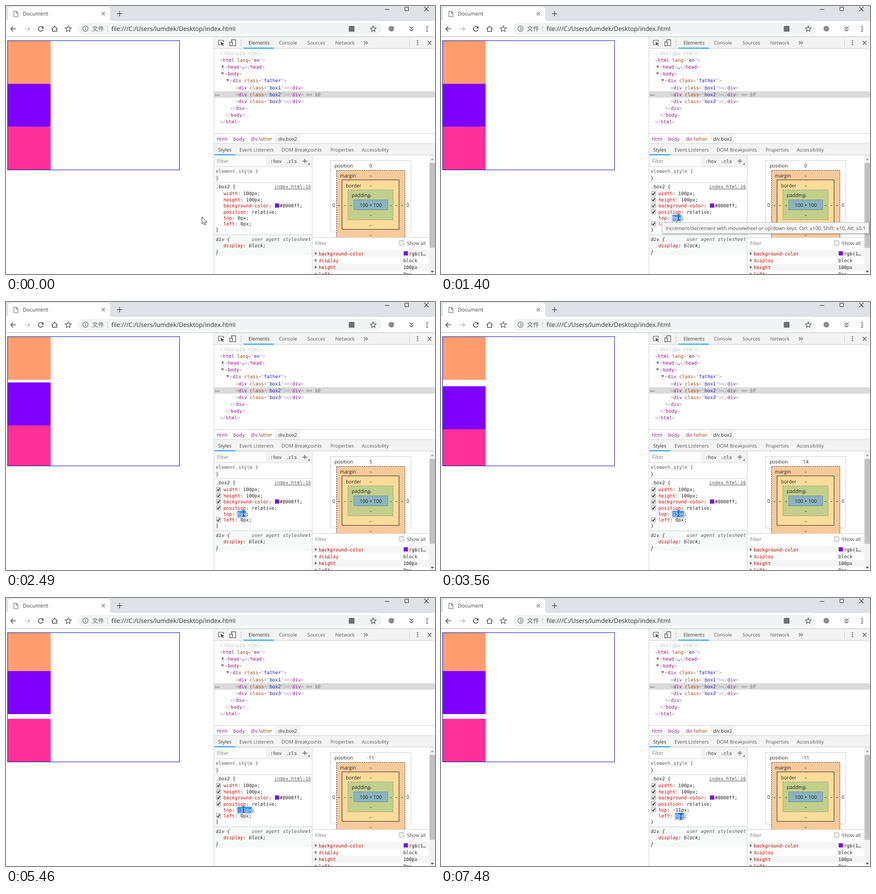
An HTML page that plays this animation: 948 px wide and 591 px high, repeating every 8000 ms.

```html
<!DOCTYPE html>
<html lang="en">
<head>
<meta charset="utf-8">
<title>Relative positioning</title>
<style>
html, body { margin: 0; width: 100%; height: 100%; overflow: hidden; background: #fff; }
svg { display: block; width: 948px; height: 591px; }
text { white-space: pre; text-rendering: geometricPrecision; }
.ui { font: 10.75px "Open Sans", "Noto Sans", sans-serif; }
.mono { font: 10.4px "DejaVu Sans Mono", monospace; }
</style>
</head>
<body>
<svg id="stage" viewBox="0 0 948 591" xmlns="http://www.w3.org/2000/svg"></svg>
<script>
const CHAR = 6.261;
const TAG = '#881280', ATTR = '#994500', VAL = '#1a1aa6', PUNCT = '#a894a6';
const PROP = '#c80000', INK = '#222', GREY = '#5a5a5a', LINE = '#ccc', BLUE = '#1a9bf0';

// ---- drawing helpers; text y is the middle of the row ----
const rect = (x, y, w, h, fill, more = '') =>
  `<rect x="${x}" y="${y}" width="${w}" height="${h}" fill="${fill}" ${more}/>`;
const path = (d, stroke = '#4a4d51', width = 1.4, fill = 'none') =>
  `<path d="${d}" fill="${fill}" stroke="${stroke}" stroke-width="${width}"/>`;
const solid = (d, fill) => `<path d="${d}" fill="${fill}"/>`;
const dot = (x, y, r, fill) => `<circle cx="${x}" cy="${y}" r="${r}" fill="${fill}"/>`;
const text = (cls, x, y, s, fill = INK, more = '') =>
  `<text class="${cls}" x="${x}" y="${y + 3.8}" fill="${fill}" ${more}>${s}</text>`;
const ui = (...a) => text('ui', ...a);
const mono = (...a) => text('mono', ...a);
const hue = (c, s) => `<tspan fill="${c}">${s}</tspan>`;
const size = n => `style="font-size:${n}px"`;
const mid = 'text-anchor="middle"', end = 'text-anchor="end"', italic = 'style="font-style:italic"';
const right = (x, y) => solid(`M${x} ${y - 3.5}l5 3.5l-5 3.5z`, '#6e6e6e');
const down = (x, y) => solid(`M${x} ${y - 2.5}h7l-3.5 5z`, '#6e6e6e');
const cross = (x, y, r, c, w) => path(`M${x - r} ${y - r}l${2 * r} ${2 * r}m0 ${-2 * r}l${-2 * r} ${2 * r}`, c, w);
const dots = (x, y, gap, r, c) => [-1, 0, 1].map(i => dot(x, y + i * gap, r, c)).join('');

function star(x, y, r) {
  let d = '';
  for (let i = 0; i < 10; i++) {
    const a = i * Math.PI / 5 - Math.PI / 2, q = i % 2 ? r * 0.45 : r;
    d += `${i ? 'L' : 'M'}${(x + q * Math.cos(a)).toFixed(2)} ${(y + q * Math.sin(a)).toFixed(2)}`;
  }
  return path(d + 'z', '#4a4d51', 1.2);
}

function browserBar() {
  return rect(0, 0, 948, 33, '#dee1e6') +
    solid('M-3 33Q4 33 4 27V9Q4 2 11 2H223Q230 2 230 9V27Q230 33 237 33Z', '#fff') +
    path('M17.5 11.5h5l4 4v8h-9zM22.5 11.5v4h4', '#5f6368', 1.1) +
    ui(37, 17.6, 'Document', '#3c4043', size(11.6)) +
    cross(215, 17, 3.6, '#5f6368', 1.3) +
    path('M245.5 17h11M251 11.5v11', '#4a4d51', 1.5) +
    path('M837 7.5h10M881.5 2.5h8v8h-8z', '#222', 1) +
    cross(929, 6.5, 4.8, '#222', 1.1) +
    rect(0, 33, 948, 34, '#fff') +
    rect(159, 37, 671, 26, '#f1f3f4', 'rx="13"') +
    path('M22 50.5H10.5M16 45l-5.5 5.5l5.5 5.5', '#4a4d51', 1.6) +
    path('M41 50.5h11.5M47 45l5.5 5.5l-5.5 5.5', '#b9bbbe', 1.6) +
    path('M81.3 47.2A5.3 5.3 0 1 0 82 52', '#4a4d51', 1.6) + solid('M83 44v5.5h-5.5z', '#4a4d51') +
    path('M100.5 51l6.8-6.5l6.8 6.5M102.8 49.5v6.5h9v-6.5', '#4a4d51', 1.5) +
    star(137.5, 50.5, 7.2) +
    `<circle cx="175.5" cy="50" r="5.8" fill="none" stroke="#5f6368" stroke-width="1.3"/>` +
    path('M175.5 49v4.2M175.5 46.6v1.4', '#5f6368', 1.4) +
    `<text x="190" y="55" fill="#5f6368" style="font:13.4px 'Noto Sans CJK SC','Noto Sans CJK',sans-serif">文件</text>` +
    rect(224, 43, 1, 14, '#c4c7ca') +
    ui(233, 51, 'file:///C:/Users/lumdek/Desktop/index.html', '#2b2e31', size(13.65)) +
    rect(757.5, 44, 12.5, 12.5, '#6b6e72') +
    star(811.5, 50.5, 6.6) +
    dot(851.5, 50, 6.2, '#8c8c8c') +
    path('M891.5 45.5l4.5 4l4.5-4M891.5 51l4.5 4l4.5-4', '#4a4d51', 1.6) +
    dots(930.5, 50.5, 4.7, 1.5, '#4a4d51') +
    rect(0, 67, 948, 1, '#b8babd');
}

function page() {
  return rect(4, 77, 94.6, 94.6, '#ff9d6f') + rect(4, 266.4, 94.6, 94.8, '#ff3097') +
    '<rect id="box" x="4" width="94.6" height="94.8" fill="#8000ff"/>' +
    rect(3.5, 76.5, 380, 285, 'none', 'stroke="#0000b4"');
}

const open = (name, attr, value) =>
  hue(PUNCT, '&lt;') + name +
  (attr ? ' ' + hue(ATTR, attr) + hue(PUNCT, '="') + hue(VAL, value) + hue(PUNCT, '"') : '') + hue(PUNCT, '&gt;');
const close = name => hue(PUNCT, '&lt;/') + name + hue(PUNCT, '&gt;');

function elements() {
  const child = n => open('div', 'class', 'box' + n) + close('div');
  const rows = [
    [473, hue('#c0c0c0', '&lt;!doctype html&gt;')],
    [473, open('html', 'lang', 'en')],
    [484, open('head') + hue(INK, '…') + close('head')],
    [484, open('body')],
    [495, open('div', 'class', 'father')],
    [507.5, child(1)], [507.5, child(2)], [507.5, child(3)],
    [495.5, close('div')], [484.5, close('body')], [473, close('html')]
  ];
  return rect(459, 68, 489, 26, '#f3f3f3') + rect(459, 93, 489, 1, LINE) +
    path('M474 85.5h-4.5v-10h11v4', '#5a5a5a', 1.2) + solid('M474 79l8.5 4l-3.6 1l2.6 3l-1.4 1.2l-2.6-3l-2 2.8z', '#5a5a5a') +
    path('M498.5 79v-4.5h9v13h-5M494.5 79.5h6v8h-6z', '#5a5a5a', 1.3) +
    rect(519, 73, 1, 16, LINE) + rect(891, 73, 1, 16, LINE) +
    ui(536, 81.5, 'Elements', '#333') + ui(603, 81.5, 'Console', GREY) +
    ui(666, 81.5, 'Sources', GREY) + ui(727.5, 81.5, 'Network', GREY) +
    rect(525, 92, 67, 2, BLUE) +
    path('M791 77.5l3.5 3.5l-3.5 3.5M795.5 77.5l3.5 3.5l-3.5 3.5', GREY, 1.3) +
    dots(909.5, 81, 4.2, 1.3, GREY) + cross(936, 81, 4, GREY, 1.5) +
    rect(460, 188, 488, 14, '#dadada') +
    [463.5, 467, 470.5].map(x => dot(x, 196.5, 1.2, '#6e6e6e')).join('') +
    right(477, 133.5) + down(475, 149) + down(486.5, 164) +
    rows.map(([x, s], i) => mono(x, 104 + i * 15.15, s, TAG)).join('') +
    mono(664, 195, '== $0', '#777', italic) +
    rect(460, 281, 488, 1, LINE) + rect(596, 282, 54, 21, '#f3f3f3') +
    ui(466, 293, 'html', TAG) + ui(502, 293, 'body', TAG) +
    ui(541, 293, hue(TAG, 'div') + hue(ATTR, '.father')) + ui(601.5, 293, 'div.box2', '#333');
}

function styles() {
  const prop = (y, name, value) => mono(480.5, y, hue(PROP, name) + ': ' + value);
  return rect(460, 303, 488, 26, '#f3f3f3') + rect(460, 303, 488, 1, LINE) + rect(460, 328, 488, 1, LINE) +
    [[469, 'Styles', '#333'], [516, 'Event Listeners'], [609, 'DOM Breakpoints'], [717, 'Properties'], [786, 'Accessibility']]
      .map(([x, s, c]) => ui(x, 317, s, c || GREY)).join('') +
    rect(461, 327, 46, 2, BLUE) +
    rect(460, 329, 216, 25, '#f3f3f3') + rect(463, 332, 111, 20, '#fff') +
    rect(460, 354, 216, 1, '#ddd') +
    ui(466.5, 342, 'Filter', '#777') + mono(584, 342, ':hov', '#333') + mono(618, 342, '.cls', '#333') +
    path('M655.5 342h10M660.5 337v10', GREY, 1.4) + solid('M671 346v4h-4z', '#555') +
    mono(463.5, 364, 'element.style {', GREY) + mono(463.5, 379, '}') +
    rect(460, 389, 216, 1, LINE) +
    mono(463.5, 398.5, '.box2 {') + mono(674, 398.5, 'index.html:16', GREY, end + ' text-decoration="underline"') +
    prop(413.5, 'width', '100px;') + prop(427, 'height', '100px;') +
    prop(440.3, 'background-color', '') + rect(594.5, 435.5, 9, 9, '#8000ff', 'stroke="#777" stroke-width=".6"') +
    mono(605, 440.3, '#8000ff;') + prop(453.7, 'position', 'relative;') + mono(463.5, 493.5, '}') +
    rect(460, 504, 216, 46, '#f7f9f9') + rect(460, 504, 216, 1, LINE) +
    mono(463.5, 513.7, 'div {', INK, italic) +
    mono(674, 513.7, 'user agent stylesheet', GREY, end + ' ' + italic) +
    mono(480.5, 528.5, hue(PROP, 'display') + ': block;', INK, italic) + mono(463.5, 542, '}', INK, italic) +
    rect(676, 329, 1, 262, LINE);
}

function boxModel() {
  const dash = 'stroke-dasharray="3 2"';
  const at = (x, y, s) => ui(x, y, s, '#222', mid);
  return `<clipPath id="clip">${rect(677, 330, 258, 180, '#000')}</clipPath><g clip-path="url(#clip)">` +
    rect(717.5, 340.5, 177, 158, 'none', 'stroke="#999" stroke-dasharray="1 1"') +
    rect(730.5, 362.5, 151, 166, '#f8ca9a', 'stroke="#222" ' + dash) +
    rect(742.5, 383.5, 126, 109, '#fddc9a', 'stroke="#222"') +
    rect(755.5, 405.5, 100, 66, '#c2cf8a', 'stroke="#808080" ' + dash) +
    rect(768.5, 427.5, 75, 22, '#8bb4c0', 'stroke="#6f8b93"') +
    ui(726, 352, 'position') + ui(738, 374, 'margin') + ui(751, 396, 'border') + ui(764, 417.5, 'padding') +
    at(806, 439, '100 × 100') + at(724, 439, '0') + at(888, 439, '0') +
    [374, 396, 418, 461, 483, 505].map(y => at(806, y, '–')).join('') +
    [736.5, 749, 762, 850, 863, 875.5].map(x => at(x, 439, '–')).join('') + '</g>';
}

function computed() {
  const rows = [['background-color', 'rgb(1…'], ['display', 'block'], ['height', '100px'], ['left', '0px']];
  return rect(677, 510, 258, 1, LINE) + ui(683, 523.5, 'Filter', '#777') +
    rect(869.5, 517.5, 10, 10, '#f2f2f2', 'rx="1.5" stroke="#999"') + ui(886, 523.5, 'Show all', '#444') +
    rows.map(([name, value], i) => {
      const y = 545.7 + i * 15.2;
      return (i % 2 ? '' : rect(677, y - 7.6, 258, 15.2, '#f5f5f5')) + right(682.5, y) +
        mono(691, y, name, PROP) + mono(i ? 878 : 890.5, y, value);
    }).join('') +
    rect(879, 541, 9, 9, '#8000ff', 'stroke="#777" stroke-width=".6"') +
    rect(935, 329, 13, 262, '#f1f1f1') + rect(936, 346, 12, 187, '#c1c1c1') +
    solid('M938.5 340h7l-3.5-4z', '#a3a3a3') + solid('M938.5 584h7l-3.5 4z', '#505050') +
    rect(459, 68, 1, 523, LINE);
}

// ---- the changing part ----
const check = y => rect(464.5, y - 5, 10, 10, '#f4f4f4', 'rx="1.5" stroke="#8d8d8d"') +
  path(`M466.7 ${y}l2.2 2.6l3.8-5.6`, '#222', 1.7);

function field(name, value, y, editing) {
  const x = 480.5 + CHAR * (name.length + 2), w = CHAR * value.length;
  const label = mono(480.5, y, hue(PROP, name) + ': ');
  if (!editing) return label + mono(x, y, value + ';');
  return label + mono(x + w, y, ';') +
    rect(x - 2, y - 7.5, w + 3, 15, '#fff', 'style="filter:drop-shadow(0 1px 1.5px #0007)"') +
    rect(x - .5, y - 6.5, w + .5, 13, '#338fff') + mono(x, y, value, '#fff');
}

function pointer(x, y) {
  if (x < 470) return path(`M${x} ${y}v15.5l3.6-3.3l2.5 5.6l2.3-1l-2.5-5.5h4.9z`, '#222', 1, '#fff');
  return path(`M${x - 3} ${y - 6.5}h2.2l.8 .8l.8-.8h2.2M${x} ${y - 6}v12.5M${x - 3} ${y + 7}h2.2l.8-.8l.8 .8h2.2`, '#111', 1);
}

const tip = () =>
  rect(488.5, 477.5, 457, 24, '#f5f5f5', 'stroke="#c4c4c4" style="filter:drop-shadow(1px 1px 1.5px #0006)"') +
  ui(496.5, 490, 'Increment/decrement with mousewheel or up/down keys. Ctrl: ±100, Shift: ±10, Alt: ±0.1', '#555', size(10.85));

// time, top, shown offset, pointer x, pointer y, mode
const steps = [
  [0, 0, 0, 433, 465, 'out'], [130, 0, 0, 446, 467, 'out'], [290, 0, 0, 478, 469, 'hover'],
  [440, 0, 0, 505, 467, 'hover'], [600, 0, 0, 520, 466, 'hover'], [750, 0, 0, 525, 465.5, 'hover'],
  [1240, 0, 0, 525, 465.5, 'top'], [1400, 0, 0, 525, 465.5, 'tip'],
  [1550, 1, 0], [1710, 2, 1], [1860, 2, 2], [2020, 3, 2], [2180, 4, 3],
  [2330, 5, 4], [2490, 6, 5], [2640, 7, 6], [2790, 9, 8], [2950, 10, 9], [3100, 12, 11], [3250, 13, 12],
  [3400, 14, 13], [3560, 15, 14], [3720, 16, 15], [3870, 17, 16], [4030, 17, 17],
  [4510, 15, 16], [4670, 11, 13], [4840, 6, 8], [5000, 1, 3], [5150, -5, -3], [5300, -11, -10], [5460, -11, -11],
  [6680, -11, -11, 525, 468, 'top'], [6840, -11, -11, 527, 474, 'top'], [7000, -11, -11, 529, 480, 'top'],
  [7160, -11, -11, 530, 482, 'hover'], [7320, -11, -11, 530, 482, 'left']
];

const stage = document.getElementById('stage');
stage.innerHTML = rect(0, 0, 948, 591, '#fff') + browserBar() + page() + elements() + styles() +
  boxModel() + computed() + '<g id="live"></g>';
const box = document.getElementById('box'), live = document.getElementById('live');

function show([, top, offset, x = 525, y = 465.5, mode = 'top']) {
  const editTop = mode === 'top' || mode === 'tip', editLeft = mode === 'left';
  const marks = mode === 'out' ? [] : [413.5, 427, 440.3, 453.7];
  if (mode !== 'out' && !editTop) marks.push(467);
  if (mode !== 'out' && !editLeft) marks.push(480.3);
  box.setAttribute('y', 171.6 + 0.95 * top);
  live.innerHTML = marks.map(check).join('') +
    field('left', '0px', 480.3, editLeft) + field('top', top + 'px', 467, editTop) +
    ui(806, 352, offset, '#222', mid) +
    (mode === 'hover' ? dots(661.5, 492.5, 3.8, 1.2, '#6e6e6e') : '') +
    (mode === 'tip' ? tip() : '') + pointer(x, y);
}

let last = -1;
function frame() {
  const t = performance.now() % 8000;
  let i = steps.length - 1;
  while (steps[i][0] > t) i--;
  if (i !== last) show(steps[last = i]);
  requestAnimationFrame(frame);
}
frame();
</script>
</body>
</html>
```
